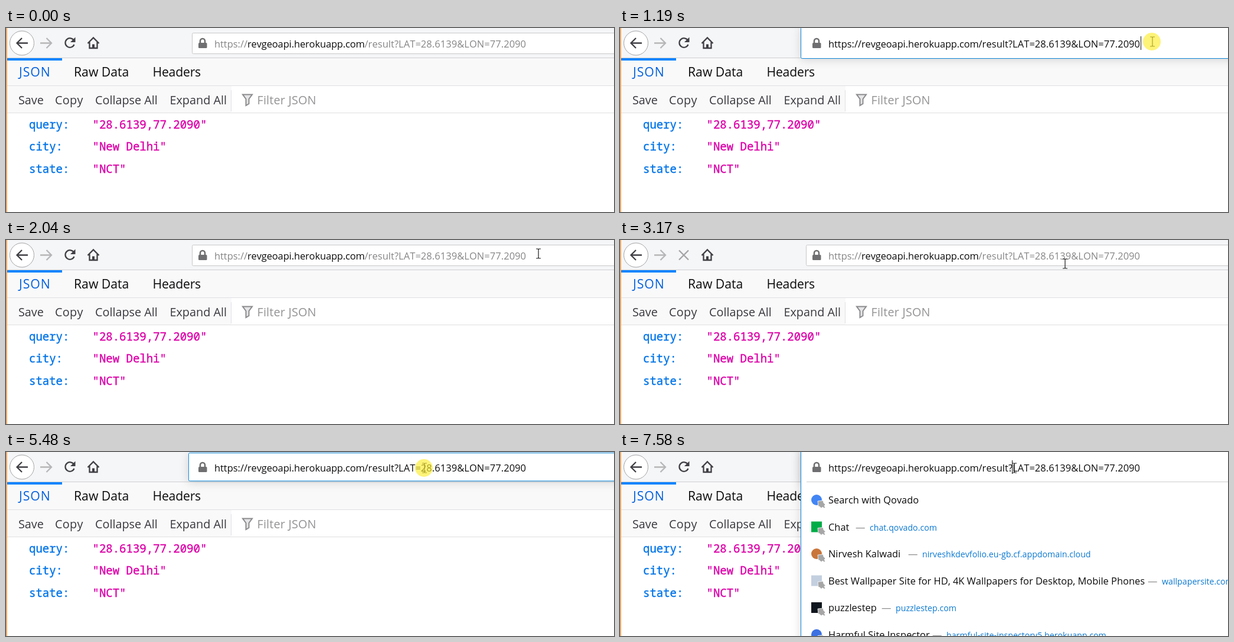
An HTML page that plays this animation: 1030 px wide and 311 px high, repeating every 8000 ms.

```html
<!DOCTYPE html>
<html lang="en">
<head>
<meta charset="utf-8">
<title>JSON viewer</title>
<style>
  html, body { margin: 0; width: 100%; height: 100%; overflow: hidden; background: #fff; }
  svg { display: block; width: 100vw; height: 100vh; }
  text { font-family: "Open Sans", "Noto Sans", sans-serif; font-kerning: none; white-space: pre; }
  .tab { font-size: 21.2px; fill: #0c0c0d; }
  .tool { font-size: 19.8px; fill: #38383d; }
  .mono { font: 500 19px "Noto Sans Mono", monospace; fill: #0074e8; stroke: #0074e8; stroke-width: .4; }
  .value { fill: #dd00a9; stroke: #dd00a9; }
  .raw { font-size: 19.5px; fill: #38383d; }
  .url, .title { font-size: 16.42px; fill: #0c0c0d; }
  .dash { font-size: 16.42px; fill: #8c8c8c; }
  .link { font-size: 14.2px; fill: #0a78d1; }
  .line { fill: none; stroke: #3f3f44; stroke-width: 2.3; }
</style>
</head>
<body>
<svg viewBox="0 0 1030 311" preserveAspectRatio="none">
  <defs>
    <filter id="shadow" filterUnits="userSpaceOnUse" x="270" y="-30" width="800" height="400">
      <feDropShadow dx="0" dy="2" stdDeviation="8" flood-opacity=".15"/>
    </filter>
    <path id="pin" fill="#a6a6a6" stroke="#fff" stroke-width=".8"
          d="M-6-5L3-6L4-2L7 1L5 3L7 6L5 7L2 5L0 7L-3 4L-5 4Z"/>
  </defs>
  <rect width="1030" height="311" fill="#fff"/>

  <g id="viewer"></g>
  <text id="raw" class="raw" x="17" y="88">{"query": "28.6139,77.2090", "city": "New Delhi", "state": "NCT"}</text>

  <rect width="1030" height="50" fill="#f5f6f7"/>
  <path d="M0 50.5H1030" stroke="#cfcfd1"/>
  <circle cx="27" cy="25.5" r="20.5" fill="#fff" stroke="#a4a4a6"/>
  <path class="line" d="M37 25.5H19M27 17L18.5 25.5L27 34"/>
  <path class="line" style="stroke:#b6b6b8" d="M58 25.5H76M68.5 17L77 25.5L68.5 34"/>
  <g id="reload">
    <path class="line" d="M115 21A7.8 7.8 0 1 0 115.5 28"/>
    <path fill="#3f3f44" d="M117.5 15.5V24H109Z"/>
  </g>
  <path id="stop" class="line" style="stroke:#a3a3a5" d="M100 17.5L116 33.5M116 17.5L100 33.5"/>
  <path class="line" d="M138.5 26L148 16.5L157.5 26M141.5 24V34H154.5V24"/>
  <path d="M148 34V27.5" stroke="#3f3f44" stroke-width="4"/>

  <rect id="bar" rx="2"/>
  <g id="popup"></g>
  <g fill="none" stroke="#6f6f71" stroke-width="2.6">
    <path d="M329 25.5V22A4 4 0 0 1 337 22V25.5"/>
    <rect x="326" y="25" width="14.5" height="9" rx="1.5" fill="#6f6f71" stroke="none"/>
  </g>
  <rect id="selection" x="353" y="14" width="529" height="23" fill="#0078d7"/>
  <g id="address">
    <text class="url" x="353" y="33">https://</text>
    <text class="url" x="409" y="33" letter-spacing="-.1">revgeoapi.herokuapp.com</text>
    <text class="url" x="607.5" y="33" letter-spacing=".1">/result?LAT=28.6139&amp;LON=77.2090</text>
  </g>
  <path id="caret" d="M0 14V37" stroke="#111"/>
  <rect width="2" height="311" fill="#f5a862"/>
  <g id="pointer">
    <path id="beam" fill="none" stroke-width="1.2" d="M-4-8H-1L0-7L1-8H4M0-7V7M-4 8H-1L0 7L1 8H4"/>
    <path id="arrow" fill="#fff" stroke="#111" d="M0 0V16L4 12.5L6.5 18L9 17L6.5 11.5H11.5Z"/>
    <circle id="halo" cx="-1" r="15" fill="#fcec30" fill-opacity=".65"/>
  </g>
</svg>

<script>
const LOOP = 8000;
const $ = id => document.getElementById(id);
const clamp = v => Math.max(0, Math.min(1, v));
const within = (t, from, to) => t >= from && t < to;
const set = (el, attrs) => { for (const k in attrs) el.setAttribute(k, attrs[k]); };
const show = (id, on) => set($(id), { visibility: on ? "visible" : "hidden" });
const label = (cls, x, y, s, spacing = 0) =>
  `<text class="${cls}" x="${x}" y="${y}" letter-spacing="${spacing}">${s}</text>`;

const rows = [["query", "28.6139,77.2090"], ["city", "New Delhi"], ["state", "NCT"]];
const rowY = i => Math.floor(170 + i * 37.5);
$("viewer").innerHTML = `
  <rect y="51" width="1030" height="92" fill="#f9f9fa"/>
  <rect x="382" y="98" width="648" height="45" fill="#fff"/>
  <path d="M0 97.5H1030M0 143.5H1030M381.5 105V141" stroke="#e0e0e2"/>
  <rect y="51" width="95" height="4" fill="#0a84ff"/>
  <path d="M401 112.5H417L411.5 120V128L406.5 131V120Z" fill="#e6e6e8" stroke="#8b8b8e" stroke-width="2"/>` +
  label("tab", 22, 82, '<tspan fill="#0060df">JSON</tspan>', 1) +
  label("tab", 115, 82, "Raw Data") +
  label("tab", 248.5, 82, "Headers", -.2) +
  label("tool", 21, 129, "Save") +
  label("tool", 83, 129, "Copy", .3) +
  label("tool", 151, 129, "Collapse All") +
  label("tool", 277.5, 129, "Expand All") +
  label("tool", 425.5, 129, '<tspan fill="#939395">Filter JSON</tspan>', .2) +
  rows.map(([key, value], i) =>
    label("mono", 39, rowY(i), key + ":") +
    label("mono value", 146.5, rowY(i), `"${value}"`)).join("");

// title, link, link x, icon colour, round icon
const suggestions = [
  ["Search with Qovado", "", 0, "#4285f4", true],
  ["Chat", "chat.qovado.com", 423, "#00ac47"],
  ["Nirvesh Kalwadi", "nirveshkdevfolio.eu-gb.cf.appdomain.cloud", 512, "#c9753a", true],
  ["Best Wallpaper Site for HD, 4K Wallpapers for Desktop, Mobile Phones", "wallpapersite.com", 918, "#c3cfdf"],
  ["puzzlestep", "puzzlestep.com", 467, "#10161d"],
  ["Harmful Site Inspector", "harmful-site-inspectory5.herokuapp.com", 553, "#3b70e2", true],
];
$("popup").innerHTML = `
  <rect x="306.5" y="-10" width="740" height="340" fill="#fff" stroke="#0a84d8" filter="url(#shadow)"/>
  <path d="M316 50.5H1030" stroke="#cdcdcf"/>` +
  suggestions.map(([title, link, x, color, round], i) => {
    const y = 81 + i * 45.5;
    return `<rect x="324" y="${y - 9}" width="18" height="18" rx="${round ? 9 : 0}" fill="${color}"/>
      <use href="#pin" x="341" y="${y + 7}"/>` +
      label("title", 353, y + 6, title) +
      (link && label("dash", x - 24, y + 6, "—") + label("link", x, y + 6, link));
  }).join("");

// time, x, y
const path = [
  [310, 936, 226], [770, 902, 23], [3030, 902, 23], [3100, 822, 45], [3170, 754, 40],
  [4520, 754, 40], [5240, 709, 27], [5949, 709, 27], [5950, 700, 27], [6280, 668, 27], [LOOP, 668, 27],
];
function pointerAt(t) {
  const i = Math.max(1, path.findIndex(p => p[0] > t));
  const [t0, x0, y0] = path[i - 1], [t1, x1, y1] = path[i];
  const u = clamp((t - t0) / (t1 - t0)), e = u * (2 - u);
  return [x0 + (x1 - x0) * e, y0 + (y1 - y0) * e];
}

function draw(t) {
  const focusStart = within(t, 1090, 2040) ? 1090 : t >= 5430 ? 5430 : Infinity;
  const grow = clamp((t - focusStart) / 75);
  const focused = t >= focusStart;
  const open = t >= focusStart + 200;
  const selected = open && t < 6840;

  const raw = within(t, 4520, 4610);
  show("raw", raw);
  show("viewer", !raw);
  const stop = clamp((t - 2060) / 200) * clamp((4720 - t) / 130);
  set($("stop"), { opacity: stop });
  set($("reload"), { opacity: 1 - stop });

  set($("bar"), {
    x: 315.5 - 9 * grow, y: 8.5 - 10 * grow, width: 740, height: 35 + 18 * grow,
    fill: "#fff", stroke: focused ? "#0a84d8" : "#c8c8ca",
    filter: focused ? "url(#shadow)" : "none",
  });
  show("popup", open);
  show("selection", selected);
  [...$("address").children].forEach((part, i) => {
    part.style.fill = selected ? "#fff" : focused || i === 1 ? "#0c0c0d" : "#858587";
  });

  const clicked = within(t, 1090, 1290);
  show("caret", clicked || within(t, 6840, 7070) || t >= 7580);
  set($("caret"), { transform: `translate(${clicked ? 882.5 : 664.5})` });

  const [x, y] = pointerAt(t);
  const moving = t >= 310;
  set($("pointer"), { transform: `translate(${x} ${y})` });
  show("halo", clicked || within(t, 5430, 5630) || within(t, 6600, 6840));
  show("beam", moving && y <= 44);
  show("arrow", moving && y > 44);
  set($("beam"), { stroke: selected && x < 882 ? "#ff8728" : "#1a1a1a" });
}

const start = performance.now();
function frame() {
  draw((performance.now() - start) % LOOP);
  requestAnimationFrame(frame);
}
frame();
</script>
</body>
</html>
```
